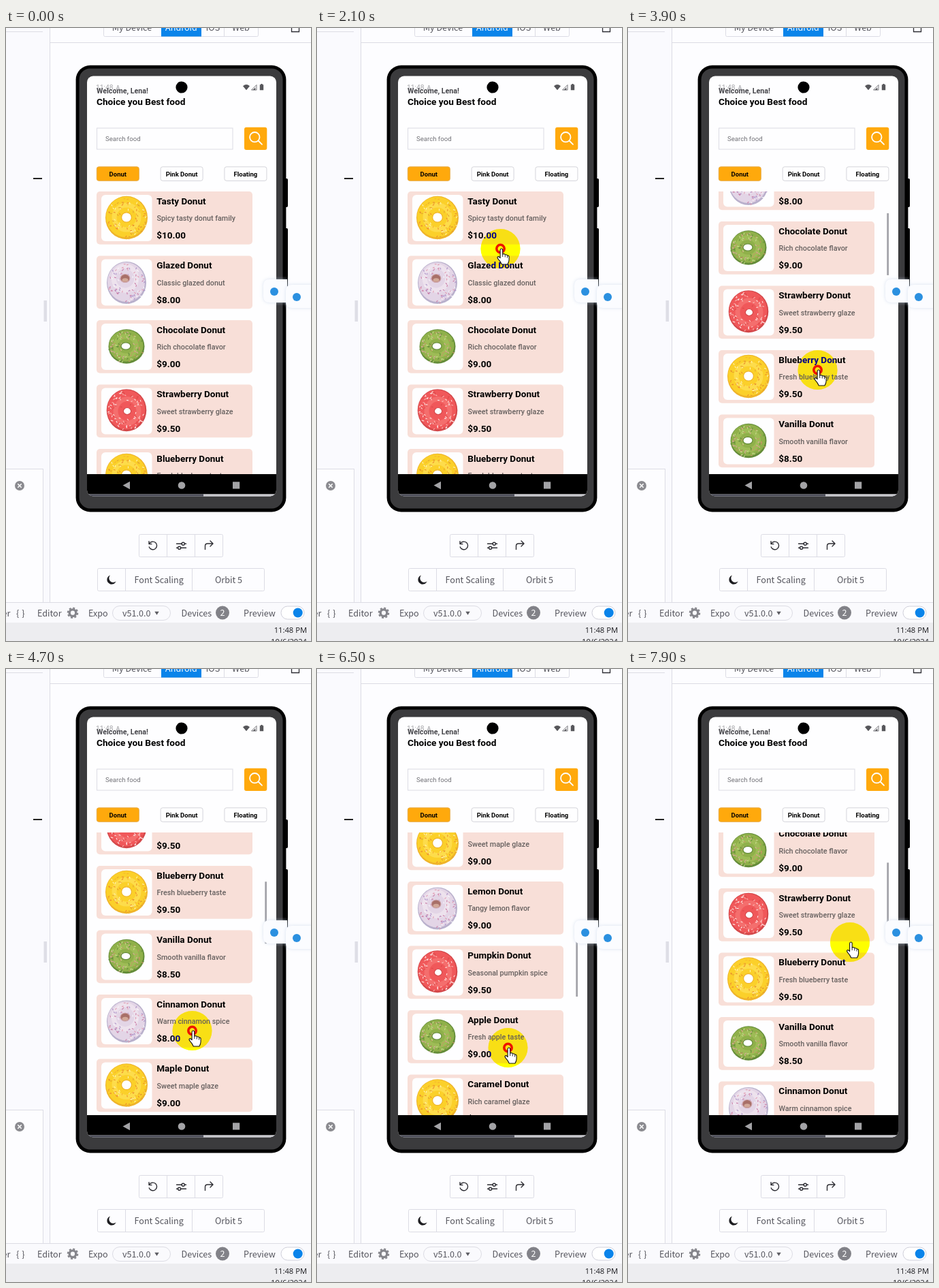
Animation, 448 px wide and 900 px high, one loop 8000 ms. Source, as an HTML page:

```html
<!DOCTYPE html>
<html lang="en">
<head>
<meta charset="utf-8">
<title>Donut shop preview</title>
<style>
html, body { margin: 0; width: 100%; height: 100%; overflow: hidden; background: #fdfdff; }
svg { display: block; width: 448px; height: 900px; }
text { white-space: pre; }
.app { font-family: Roboto, sans-serif; }
.ui { font-family: "Noto Sans CJK SC", "Noto Sans CJK JP", "Noto Sans CJK", "Noto Sans", sans-serif; font-size: 12.6px; fill: #54545c; }
.os { font-family: "Open Sans", sans-serif; font-size: 11.2px; fill: #1c1c20; }
.line { fill: none; stroke: #dcdce4; }
.icon { fill: none; stroke: #2e2e34; stroke-width: 1.4; stroke-linecap: round; stroke-linejoin: round; }
</style>
</head>
<body>
<svg id="stage" viewBox="0 0 448 900">
  <defs>
    <clipPath id="view"><rect x="119" y="240" width="278" height="415"/></clipPath>
    <clipPath id="screen"><rect x="119" y="70.5" width="278" height="617" rx="9"/></clipPath>
    <filter id="glow" x="-50%" y="-50%" width="200%" height="200%"><feGaussianBlur stdDeviation="2.5"/></filter>
  </defs>

  <!-- editor window -->
  <rect width="448" height="900" fill="#fdfdff"/>
  <rect width="64" height="843" fill="#fafafe"/>
  <rect y="647" width="54" height="196" fill="#fdfdff"/>
  <path class="line" d="M0 5.5H54M54.5 647V843M0 647.5H54M64.5 0V843M64 21.5H448"/>
  <rect x="40" y="220" width="13" height="2" fill="#222"/>
  <rect x="55.5" y="400" width="4.5" height="31" fill="#dedee6"/>
  <circle cx="20" cy="672" r="7" fill="#8b8b90"/>
  <path d="M17.3 669.3l5.4 5.4m0-5.4l-5.4 5.4" stroke="#fff" stroke-width="1.6"/>

  <rect class="line" x="143.5" y="-15" width="227" height="27.5" rx="2"/>
  <rect x="228" y="-2" width="59" height="14.5" fill="#0a84ea"/>
  <path class="line" d="M320.5 0V12"/>
  <g class="ui" text-anchor="middle">
    <text x="185" y="4">My Device</text>
    <text x="257.5" y="4" style="fill:#fff">Android</text>
    <text x="304" y="4">iOS</text>
    <text x="345" y="4">Web</text>
  </g>
  <path d="M419.5 0V5.5H430.5V0" fill="none" stroke="#2e2e34" stroke-width="1.3"/>

  <!-- phone -->
  <path d="M409 221h3.5q1.5 0 1.5 2v38q0 2-1.5 2h-3.5zM409 294h3.5q1.5 0 1.5 2v84q0 2-1.5 2h-3.5z"/>
  <rect x="102.6" y="54.8" width="308.8" height="655.6" rx="21"/>
  <rect x="107.5" y="59.5" width="299" height="646" rx="16" fill="#3b3b3d"/>
  <g clip-path="url(#screen)">
    <rect x="119" y="70" width="278" height="618" fill="#fefeff"/>
    <g class="app">
      <text x="132" y="91" font-size="10.3" fill="#a9a9ac">11:48</text>
      <text x="161.5" y="91" font-size="9" fill="#8f8f94">A</text>
      <text x="133" y="96" font-size="10.7" font-weight="600" fill="#45454a">Welcome, Lena!</text>
      <text x="133" y="113" font-size="13.65" font-weight="700">Choice you Best food</text>
      <text x="146" y="166" font-size="9.6" fill="#707076">Search food</text>
    </g>
    <circle cx="258" cy="87" r="8.6"/>
    <g fill="#56565a">
      <path d="M348 85.2q5-4.6 10 0l-5 6z"/>
      <path d="M360.5 91l7.5-7.5v7.5z" fill="none" stroke="#77777c"/>
      <path d="M362.5 91l3.8-3.8v3.8z"/>
      <path d="M372.8 83.3h1.5v-1.3h2.4v1.3h1.5v8h-5.4z"/>
    </g>
    <rect class="line" x="133.5" y="147" width="199.5" height="31"/>
    <rect x="350" y="145.7" width="33.3" height="33.3" rx="3" fill="#ffa90c"/>
    <g fill="none" stroke="#fff" stroke-width="1.8" stroke-linecap="round">
      <circle cx="365.3" cy="160.2" r="7.2"/><path d="M370.6 165.5l5.4 5.4"/>
    </g>
    <g id="chips" class="app"></g>
    <g clip-path="url(#view)"><g id="list" class="app"></g></g>
    <rect id="bar" x="380.3" width="2.7" height="91" fill="#a2a2a8"/>
    <rect x="119" y="655" width="278" height="29.5"/>
    <rect x="119" y="684.5" width="171" height="3.5" fill="#4b4c58"/>
    <rect x="290" y="684.5" width="107" height="3.5" fill="#c6c6cc"/>
    <g fill="#a3a3a6"><path d="M171.5 671.5l10.5-5.7v11.4z"/><circle cx="258" cy="671.5" r="5.3"/><rect x="333" y="666.3" width="10.2" height="10.2"/></g>
  </g>

  <!-- controls under the phone -->
  <rect class="line" x="195.5" y="743.5" width="123" height="33" rx="2"/>
  <path class="line" d="M236.5 744V776M277.5 744V776"/>
  <rect class="line" x="134.5" y="793.5" width="245" height="33" rx="2"/>
  <path class="line" d="M175.5 794V826M273.5 794V826"/>
  <g class="icon">
    <path d="M210.6 757.2a5.8 5.8 0 1 1-.3 4.8M210 753.6v4h4"/>
    <path d="M250.5 757.3h7.5M262.5 757.3h2M250.5 763.3h2M257 763.3h7.5"/>
    <circle cx="260.2" cy="757.3" r="2.1"/><circle cx="254.6" cy="763.3" r="2.1"/>
    <path d="M292.5 765.5v-5q0-3.5 3.5-3.5h7.5M300 753l4 4-4 4"/>
  </g>
  <path d="M153 803.5a6.8 6.8 0 1 0 8.5 9a6.2 6.2 0 0 1-8.5-9z" fill="#1c1c20"/>
  <g class="ui" text-anchor="middle">
    <text x="224.7" y="815">Font Scaling</text>
    <text x="327" y="815">Orbit 5</text>
  </g>

  <!-- status bar and taskbar -->
  <rect y="843" width="448" height="30" fill="#fafafd"/>
  <path class="line" d="M0 843.5H448"/>
  <g class="ui">
    <text x="-5.5" y="863.5">er</text><text x="15" y="863.5" letter-spacing="4">{}</text>
    <text x="46" y="863.5">Editor</text><text x="121" y="863.5">Expo</text>
    <text x="257.5" y="863.5">Devices</text><text x="349" y="863.5">Preview</text>
  </g>
  <g fill="none" stroke="#85858b">
    <circle cx="98" cy="858.7" r="4.8" stroke-width="3.4"/>
    <circle cx="98" cy="858.7" r="7.2" stroke-width="2.2" stroke-dasharray="3 2.65"/>
  </g>
  <rect class="line" x="156.5" y="848.5" width="85" height="21" rx="10.5"/>
  <text class="ui" x="171" y="863.5">v51.0.0</text>
  <path d="M218.3 856.7h6.4l-3.2 5z" fill="#5c5c62"/>
  <circle cx="318" cy="858.5" r="10" fill="#828288"/>
  <text class="ui" x="318" y="863" text-anchor="middle" style="fill:#fff">2</text>
  <rect x="404" y="849" width="34" height="19" rx="9.5" fill="#fff" stroke="#d0d0da"/>
  <circle cx="428.7" cy="858.5" r="7" fill="#0a84ea"/>
  <rect y="873" width="448" height="27" fill="#ededf0"/>
  <text class="os" x="442" y="888" text-anchor="end">11:48 PM</text>
  <text class="os" x="442" y="905" text-anchor="end">10/6/2024</text>

  <g id="cursor">
    <circle r="29" fill="#00f" style="mix-blend-mode:difference"/>
    <circle r="29" fill="#ffff88" style="mix-blend-mode:multiply"/>
    <circle id="press" r="5.7" fill="none" stroke="#ee1400" stroke-width="3.6"/>
    <path d="M-.4 2q0-2 1.8-2t1.8 2v6q3-1 3.6 1q2.6-.8 3.2 1.2q2.6-.4 2.6 2v4q0 3-2.2 6.8h-8.6q-1.6-4-5-7.6q-2.2-2.6-.6-3.6q1.6-.8 3.4 1.8z" fill="#fff" stroke="#111" stroke-width="1.1" stroke-linejoin="round"/>
    <path d="M3.2 8v4M6.8 9.5v3M10 11v2.5" stroke="#111" stroke-width=".9"/>
  </g>

  <!-- floating side buttons -->
  <g id="floats"></g>
</svg>
<script>
const $ = id => document.getElementById(id);

function add(parent, tag, attrs, text) {
  const el = document.createElementNS("http://www.w3.org/2000/svg", tag);
  for (const key in attrs) el.setAttribute(key, attrs[key]);
  if (text) el.textContent = text;
  parent.appendChild(el);
  return el;
}

function randomizer(seed) {
  return () => (seed = seed * 16807 % 2147483647) / 2147483647;
}

const KINDS = {
  yellow: { cy: 38.5, rx: 31, ry: 31.7, base: "#fbd02a", edge: "#efb42a", light: "#ffe45c",
            hole: [177, 38, 7.4, 7.2], dots: ["#ee8a2c", "#f6b030", "#fff2b8", "#e2a030"] },
  glazed: { cy: 39.5, rx: 29, ry: 31, base: "#e3d5e6", edge: "#b9b0cc", light: "#f3eaf2",
            hole: [175, 33, 7, 6], dots: ["#c878a4", "#e09ab0", "#ac90c8", "#f9f5fa"] },
  green:  { cy: 38.5, rx: 26.5, ry: 25.2, base: "#8fb04a", edge: "#648c38", light: "#a6c45c",
            hole: [176, 38, 7, 5.2], dots: ["#c89468", "#c8dc90", "#648c3c", "#dca8a0"] },
  red:    { cy: 37.7, rx: 29.3, ry: 31, base: "#f0585a", edge: "#d4484a", light: "#f87a78",
            hole: [178, 39, 5.6, 5], dots: ["#fde0dc", "#fab4b0", "#ffeeee", "#dc4a4a"] }
};

function donut(parent, name, seed) {
  const k = KINDS[name], cx = 177, rnd = randomizer(seed);
  const [hx, hy, hw, hh] = k.hole;
  add(parent, "ellipse", { cx, cy: k.cy, rx: k.rx, ry: k.ry, fill: k.edge });
  add(parent, "ellipse", { cx: cx - .5, cy: k.cy - 1, rx: k.rx - 1.5, ry: k.ry - 2, fill: k.base });
  add(parent, "ellipse", { cx: hx, cy: hy, rx: k.rx * .58, ry: k.ry * .57, fill: "none",
    stroke: k.light, "stroke-width": 7, opacity: .65 });
  for (let i = 0; i < 85; i++) {
    const a = rnd() * Math.PI * 2, r = .32 + .62 * Math.sqrt(rnd());
    const x = cx + Math.cos(a) * k.rx * r, y = k.cy + Math.sin(a) * k.ry * r, turn = rnd() * 3.14;
    add(parent, "path", {
      d: `M${x} ${y}l${Math.cos(turn) * 2} ${Math.sin(turn) * 2}`,
      stroke: k.dots[i % 4], "stroke-width": 1.1, "stroke-linecap": "round"
    });
  }
  const glazed = name === "glazed";
  add(parent, "ellipse", { cx: hx, cy: hy, rx: hw, ry: hh, fill: glazed ? "#a87068" : "#fff",
    stroke: glazed ? "#d0a8b0" : k.edge, "stroke-width": 1.2 });
  if (glazed) add(parent, "ellipse", { cx: hx, cy: hy + 2.5, rx: 4.5, ry: 2.8, fill: "#d2a898" });
}

const ITEMS = [
  ["Tasty", "Spicy tasty donut family", "10.00", "yellow"],
  ["Glazed", "Classic glazed donut", "8.00", "glazed"],
  ["Chocolate", "Rich chocolate flavor", "9.00", "green"],
  ["Strawberry", "Sweet strawberry glaze", "9.50", "red"],
  ["Blueberry", "Fresh blueberry taste", "9.50", "yellow"],
  ["Vanilla", "Smooth vanilla flavor", "8.50", "green"],
  ["Cinnamon", "Warm cinnamon spice", "8.00", "glazed"],
  ["Maple", "Sweet maple glaze", "9.00", "yellow"],
  ["Lemon", "Tangy lemon flavor", "9.00", "glazed"],
  ["Pumpkin", "Seasonal pumpkin spice", "9.50", "red"],
  ["Apple", "Fresh apple taste", "9.00", "green"],
  ["Caramel", "Rich caramel glaze", "9.50", "yellow"]
];
const PITCH = 94.5;

ITEMS.forEach(([name, about, price, kind], i) => {
  const card = add($("list"), "g", { transform: `translate(0 ${240 + i * PITCH})` });
  add(card, "rect", { x: 133, y: 0, width: 229, height: 77.7, rx: 5, fill: "#f8dfd8" });
  add(card, "rect", { x: 140, y: 5, width: 74.5, height: 68, rx: 6, fill: "#fefeff" });
  donut(card, kind, 4117 + kind.length * 97);
  add(card, "text", { x: 221.3, y: 18.8, "font-size": 13.5, "font-weight": 700 }, name + " Donut");
  add(card, "text", { x: 221.5, y: 43, "font-size": 10.75, "font-weight": 500, fill: "#66605f" }, about);
  add(card, "text", { x: 221.3, y: 69, "font-size": 13.5, "font-weight": 700 }, "$" + price);
});

["Donut", "Pink Donut", "Floating"].forEach((label, i) => {
  const x = 133.3 + i * 93.8;
  add($("chips"), "rect", { x, y: 203.8, width: 62, height: 20.5, rx: 3,
    fill: i ? "#fefeff" : "#ffa90c", stroke: i ? "#d4d4da" : "#e6ac48" });
  add($("chips"), "text", { x: x + 31, y: 217.6, "font-size": 9.5, "font-weight": 700, "text-anchor": "middle" }, label);
});

[[378, 369, 413], [411, 377, 451]].forEach(([x, y, right]) => {
  const d = `M${x + 9} ${y}H${right}V${y + 34}H${x + 9}Q${x} ${y + 34} ${x} ${y + 25}V${y + 9}Q${x} ${y} ${x + 9} ${y}z`;
  add($("floats"), "path", { d, fill: "#c9d6ea", filter: "url(#glow)", opacity: .7 });
  add($("floats"), "path", { d, fill: "#fbfcff" });
  add($("floats"), "circle", { cx: x + 16, cy: y + 18, r: 6, fill: "#2b90e0" });
});

// rows of [time, values...]; each swipe moves the list late, then it glides out
const SCROLL = [
  [0, 0], [2300, 0], [2500, 60], [2700, 105], [3000, 132], [3400, 142], [3900, 145],
  [4000, 190], [4200, 285], [4400, 318], [4700, 329], [5400, 490], [5500, 490],
  [5700, 570], [5900, 635], [6200, 675], [6500, 684],
  [6600, 610], [6800, 430], [7000, 325], [7300, 250], [7600, 215], [7900, 201.5]
];
const POINTER = [
  [100, 300, 396], [200, 292, 386], [300, 292, 386], [700, 300, 384], [1000, 240, 405],
  [1200, 255, 408], [1300, 256, 414], [1400, 256, 414], [1800, 242, 434], [2000, 258, 420],
  [2100, 269.5, 324], [2200, 300, 190], [2300, 336, 111], [3200, 290, 240], [3700, 282, 656],
  [3900, 278.5, 502], [4100, 272, 330], [4200, 271, 264], [4300, 271, 290], [4600, 273, 550],
  [4700, 273.5, 531], [5400, 274.5, 329], [5500, 274.5, 329], [5700, 276, 258], [6400, 278, 254],
  [6500, 280.5, 556], [6600, 283, 656], [6900, 292, 630], [7400, 324, 425], [7900, 326, 401]
];
const PRESSES = [[2000, 2400], [3700, 4300], [4700, 5800], [6400, 6800]];

function sample(rows, t) {
  const n = rows.findIndex(row => row[0] >= t);
  if (n < 0) return rows[rows.length - 1].slice(1);
  if (n === 0) return rows[0].slice(1);
  const a = rows[n - 1], b = rows[n], p = (t - a[0]) / (b[0] - a[0]);
  return a.slice(1).map((v, i) => v + (b[i + 1] - v) * p);
}

const start = performance.now();
const show = (el, on) => el.setAttribute("visibility", on ? "visible" : "hidden");

function draw() {
  const t = Math.floor((performance.now() - start) % 8000 / 100) * 100;
  const [offset] = sample(SCROLL, t), [x, y] = sample(POINTER, t);
  $("list").setAttribute("transform", `translate(0 ${-offset})`);
  $("bar").setAttribute("y", 240.2 + offset * .219);
  show($("bar"), t >= 2400);
  $("cursor").setAttribute("transform", `translate(${x} ${y})`);
  show($("cursor"), t >= 100);
  show($("press"), PRESSES.some(([from, to]) => t >= from && t < to));
  requestAnimationFrame(draw);
}
draw();
</script>
</body>
</html>
```
